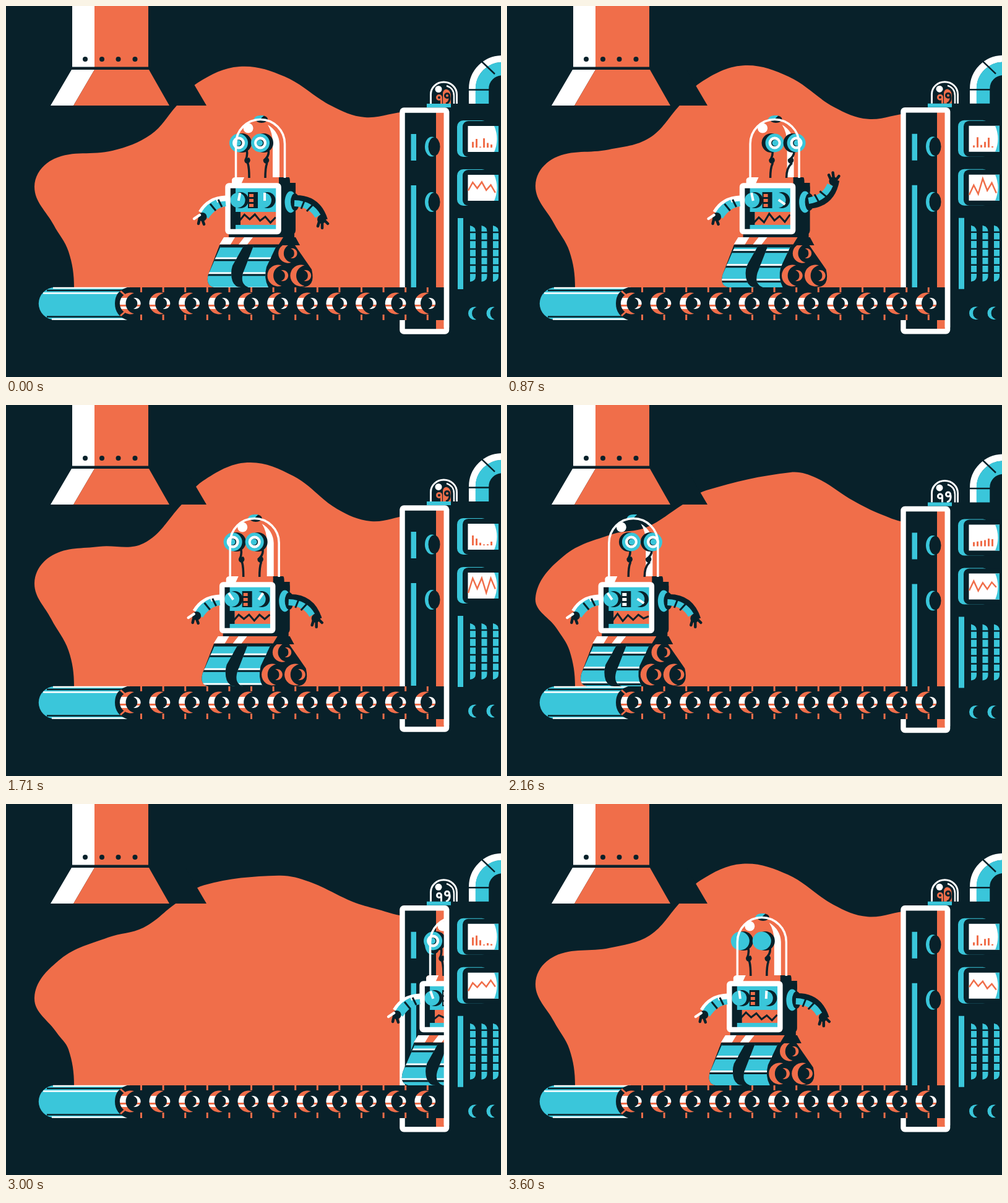
An HTML page for the animation above (3.63 s loop, 800 px wide and 600 px high).

```html
<!DOCTYPE html>
<html lang="en">
<head>
<meta charset="utf-8">
<title>Robot factory</title>
<style>
html, body { margin: 0; height: 100%; overflow: hidden; background: #08212a }
svg { display: block; width: 800px; height: 600px }
.d { fill: #08212a } .o { fill: #f06e4a } .t { fill: #3ac6da } .w { fill: #fff }
.ld, .lo, .lt, .lw { fill: none }
.ld { stroke: #08212a } .lo { stroke: #f06e4a } .lt { stroke: #3ac6da } .lw { stroke: #fff }
.lamp { fill: #fff } .ring { stroke: #fff; fill: none } .glow { fill: none }
.on .lamp, .on .glow { fill: #f06e4a }
.on .ring { stroke: #08212a } .on .ring .left { stroke: #f06e4a }
</style>
</head>
<body>
<svg viewBox="0 0 800 600">
  <defs>
    <path id="wheel" d="M5.4 -16.6A17.5 17.5 0 1 0 5.4 16.6A17 17 0 0 1 5.4 -16.6
      M4.5 -8.6A9 9 0 1 1 4.5 8.6A9 9 0 0 0 4.5 -8.6"/>
    <linearGradient id="bands" gradientUnits="userSpaceOnUse" x1="0" y1="-18" x2="0" y2="18">
      <stop offset=".24" stop-color="#f06e4a"/><stop offset=".24" stop-color="#fff"/>
      <stop offset=".56" stop-color="#fff"/><stop offset=".56" stop-color="#f06e4a"/>
      <stop offset=".64" stop-color="#f06e4a"/><stop offset=".64" stop-color="#fff"/>
      <stop offset=".74" stop-color="#fff"/><stop offset=".74" stop-color="#f06e4a"/>
    </linearGradient>
    <g id="knob"><ellipse class="t" cx="688" rx="11" ry="16"/><ellipse class="d" cx="692" rx="9.5" ry="15"/></g>
    <g id="screen">
      <rect class="t" x="729" y="185" width="50" height="59" rx="10"/>
      <rect class="d" x="738" y="186" width="70" height="58" rx="9"/>
      <path class="w" d="M746.5 194H796V236H746.5z"/>
      <path class="t" d="M789 194H796V236H789Q798 215 789 194"/>
    </g>
    <path id="grill" class="t" d="M0 355q9 2 9 10V437q0 8 -9 9z"/>
    <g id="moon"><circle class="t" r="10.5"/><circle class="d" cx="6" r="10.5"/></g>
    <clipPath id="outside"><path d="M0 0H708V600H0z"/></clipPath>
    <clipPath id="treads"><path id="treadShape" d="M347 388H384L366 420Q362 432 366 445Q370 455 380 455H336Q322 452 327 434z
      M400 388H437L421 422Q416 440 424 455H392Q378 450 383 432z"/></clipPath>
  </defs>
  <rect class="d" width="800" height="600"/>
  <path id="blob" class="o"/>
  <path class="d" d="M230 0H290V103L324 161H230z"/>

  <g id="machine">
    <g id="pipe" fill="none">
      <path class="lw" stroke-width="11" d="M753.5 158V134A48.5 48.5 0 0 1 802 85.5"/>
      <path class="lt" stroke-width="21.5" d="M769.5 158V134A32.5 32.5 0 0 1 802 101.5"/>
      <path class="ld" stroke-width="2.5" d="M746 135.5H782M769 90L790 110"/>
    </g>
    <g id="beacon">
      <path class="glow" d="M706 158V140Q708 134 713 135Q719 137 719 147V158z"/>
      <circle class="w" cx="699" cy="134.5" r="5.5"/>
      <path class="lw" stroke-width="2.5" d="M712 129Q724 133 724 145V158"/>
      <g class="ring" stroke-width="3">
        <path class="left" d="M703.500 148a3.500 3.500 0 1 0 -7 0a3.500 3.500 0 1 0 7 0V158"/>
        <path d="M716.500 145a3.500 3.500 0 1 0 -7 0a3.500 3.500 0 1 0 7 0Q719 155 711 158"/>
      </g>
      <path class="lw" stroke-width="3" d="M686.5 158V143A21 20 0 0 1 728.5 143V158"/>
      <path class="t" d="M680 158H719V164H680z"/>
    </g>
    <use href="#screen"/><use href="#screen" y="79"/>
    <path id="bars" class="lo" stroke-width="3"/>
    <path id="graph" class="lo" stroke-width="2.5"/>
    <path class="t" d="M730 343H739V458H730z"/>
    <use href="#grill" x="750"/><use href="#grill" x="768.5"/><use href="#grill" x="787"/>
    <path class="ld" stroke-width="2.5" d="M745 366H800M745 379H800M745 393H800M745 406H800M745 419H800M745 432H800"/>
    <use href="#moon" x="757.5" y="497"/><use href="#moon" x="787" y="497"/>
    <rect class="d" x="640.5" y="168" width="71.5" height="359"/>
    <path class="o" d="M695 172H709V523H695z"/>
    <path class="t" d="M654.5 207H663V250H654.5zM654.5 290H663V456H654.5z"/>
    <use href="#knob" y="227.5"/><use href="#knob" y="317"/>
    <rect class="lw" x="640.5" y="168.5" width="71.5" height="358" rx="2.5" stroke-width="8.5"/>
  </g>

  <g id="belt">
    <path class="t" d="M210 455H79A26 26 0 0 0 79 507.5H210z"/>
    <path class="lw" stroke-width="2.5" d="M76 456H200M60 464.5H190M74 506.5H200"/>
    <path class="ld" stroke-width="2.5" d="M66 460H200M66 502.5H200"/>
    <path class="d" d="M708 455H196Q176 461 176 481T196 508H708z"/>
    <path id="ticks" class="lo" stroke-width="3"/>
    <g id="rollers" fill="url(#bands)"></g>
  </g>

  <g clip-path="url(#outside)"><g id="robot">
    <path class="d" d="M345 387H467L494 426Q501 455 477 455H336Q322 452 327 434z"/>
    <use href="#treadShape" class="t"/>
    <g clip-path="url(#treads)">
      <path class="ld" stroke-width="3" d="M330 389H450"/>
      <path id="light" class="lw" stroke-width="3"/><path id="dark" class="ld" stroke-width="3"/>
    </g>
    <g class="o"><use href="#wheel" transform="translate(456 400) scale(.9)"/><use href="#wheel" x="440" y="436"/><use href="#wheel" x="477" y="436"/></g>
    <path class="d" d="M360 366H466V374H468L475 387H345L352 374H360z"/>
    <path class="o" d="M352 374H448L441 385.5H345z"/>
    <path class="w" d="M352 374H370L363 385.5H345zM385 374H399L390 385.5H376z"/>
    <rect class="d" x="366" y="286" width="102" height="84" rx="7"/>
    <path class="d" d="M440 277H457Q459 277 459 286H468V300H440z"/>
    <path class="o" d="M371 277H441V288H365V281Q366 277 371 277z"/>
    <path class="w" d="M371 277H385L380 288H365V281Q366 277 371 277z"/>

    <ellipse class="d" cx="413" cy="183" rx="10" ry="6"/>
    <path class="t" d="M400 184Q402 177 411 177H417L410 184z"/>
    <path class="w" d="M423 192Q441 203 442 223V277H431V222Q431 205 423 192"/>
    <path id="stalks" class="ld" stroke-width="3.5"/>
    <g id="eyes"></g>
    <circle class="w" cx="391.5" cy="197.5" r="8"/>
    <path class="lw" stroke-width="3.5" d="M371.5 278V223A39.5 39.5 0 0 1 450.5 223V278"/>

    <rect class="t" x="358" y="290" width="83" height="76"/>
    <path class="d" d="M362 294H371V361H362zM371 333H379V354H371z"/>
    <circle class="d" cx="379" cy="314" r="13"/><circle class="t" cx="374.5" cy="314" r="12"/>
    <circle class="d" cx="422.5" cy="314" r="13"/><circle class="t" cx="417" cy="314" r="12"/>
    <path class="d" d="M391 301H407V327H391z"/>
    <path class="lamp" d="M393 304H400V309H393zM393 312H400V317H393zM393 320H400V325H393z"/>
    <g class="lw" stroke-width="4"><path id="needle1" d="M376 315V302"/><path id="needle2" d="M418 315V302"/></g>
    <path class="o" d="M379 333H437V354H379z"/>
    <path id="mouth" class="ld" stroke-width="3"/>
    <rect class="lw" x="358.5" y="290.5" width="82" height="74.5" rx="2" stroke-width="8.5"/>

    <g id="leftArm">
      <path class="lt" stroke-width="10" d="M355 319Q336 321 323 341"/>
      <path class="lw" stroke-width="9" d="M355 311Q328 312 315 334"/>
      <path class="lt" stroke-width="8" d="M341 317Q327 323 319 336"/>
      <path class="ld" stroke-width="3" d="M343 313L349 325M330 320L339 331"/>
      <circle class="d" cx="317.5" cy="341" r="7"/>
      <g stroke-width="4.5" stroke-linecap="round"><path class="ld" d="M313 343L311 352M317 345L320 353"/><path class="lw" d="M313 338L304 344"/></g>
    </g>
    <ellipse class="t" cx="460" cy="317" rx="9.5" ry="17.5"/>
    <ellipse class="d" cx="467" cy="317" rx="7" ry="14"/>
    <g id="rightArm">
      <path class="ld" stroke-width="10" d="M465 311Q503 309 515 346"/>
      <path class="lt" stroke-width="10" d="M466 319Q493 320 504 340"/>
      <path class="ld" stroke-width="3" d="M483 313L477 328M497 320L486 332"/>
      <circle class="d" cx="510" cy="345" r="7"/>
      <path class="ld" stroke-width="4.5" stroke-linecap="round" d="M507 346L504 356M511 347L511 359M513 345L520 352"/>
    </g>
  </g></g>

  <path id="jamb" class="w" d="M707.7 170H716.2V520H707.7z"/>
  <path class="w" d="M107 0H143V98.5H107zM106 103H143L109 161H72z"/>
  <path class="o" d="M143 0H230V98.5H143zM143 103H231L264 161H109z"/>
  <g class="d"><circle cx="128" cy="86" r="4"/><circle cx="155" cy="86" r="4"/><circle cx="181.5" cy="86" r="4"/><circle cx="208.5" cy="86" r="4"/></g>
  <circle id="pulse" class="lw" cx="196.7" cy="315"/>
</svg>
<script>
const LOOP = 3630, BEAT = LOOP / 4;
const $ = id => document.getElementById(id);
const set = (id, name, value) => $(id).setAttribute(name, value);
const range = (n, f) => Array.from({ length: n }, (_, i) => f(i)).join('');
const clamp = (v, a = 0, b = 1) => Math.min(b, Math.max(a, v));
const mix = (a, b, u) => a + (b - a) * u;
const smooth = u => u * u * (3 - 2 * u);

set('ticks', 'd', 'M185 461L194 469M185 501L194 493' +
  range(14, i => `M${218.5 + i * 35.6} 455v8m0 36v9`));
$('rollers').innerHTML = range(11, i => `<use href="#wheel" x="${201.5 + i * 47.65}" y="481"/>`);
$('eyes').innerHTML = range(2, i => `<g transform="translate(${376 + 35 * i} 221.5)">
  <circle class="shade d" r="15.5"/><circle class="t" r="15"/>
  <g class="iris"><circle class="w" r="10"/><circle class="d" r="5.5"/><circle class="pupil t" r="5"/></g></g>`);

// Outline of the backdrop: time within a beat, then x, y pairs
const poses = [
  [0, 77,354, 46,292, 78,247, 172,234, 234,208, 276,161, 310,124, 377,98, 450,114, 525,161, 580,180, 650,171],
  [277, 82,370, 46,313, 88,251, 165,216, 222,200, 274,161, 320,131, 440,116, 490,126, 560,158, 600,170, 650,182],
  [345, 80,361, 46,312, 92,244, 170,209, 225,198, 284,161, 322,138, 458,109, 500,118, 560,155, 605,177, 650,190],
  [570, 74,343, 46,297, 78,236, 145,209, 215,216, 297,161, 330,135, 432,93, 495,116, 555,170, 600,191, 650,197],
  [802, 73,346, 46,288, 75,243, 150,229, 222,224, 284,161, 318,123, 390,93, 465,115, 535,168, 590,188, 650,179]
];
poses.push([BEAT, ...poses[0].slice(1)]);

function blobPath(phase) {
  const i = poses.findIndex(p => p[0] > phase), a = poses[i - 1], b = poses[i];
  const u = (phase - a[0]) / (b[0] - a[0]);
  const p = [[101, 510], [110, 455], [101, 397]];
  for (let k = 1; k < a.length; k += 2) p.push([mix(a[k], b[k], u), mix(a[k + 1], b[k + 1], u)]);
  p.push([700, 180]);
  const minus = (q, r) => [q[0] - r[0], q[1] - r[1]];
  let d = 'M110 455';
  for (let k = 1; k < p.length - 2; k++) {
    const reach = .36 * Math.hypot(...minus(p[k + 1], p[k]));
    const handle = (j, sign) => {
      const dir = minus(p[j + 1], p[j - 1]), s = sign * reach / Math.hypot(...dir);
      return [p[j][0] + s * dir[0], p[j][1] + s * dir[1]];
    };
    d += `C${handle(k, 1)} ${handle(k + 1, -1)} ${p[k + 1]}`;
  }
  return d + 'V455z';
}

function robotShift(t) {
  if (t < 1250) return t * .0248;
  if (t < 2600) return 30.5 - 236.5 * (Math.min(t - 1250, 960) / 910) ** 2.62;
  return 316 * ((3720 - t) / 720) ** 3 - .6;
}

function track(keys, t) {
  const i = keys.findIndex(k => k[0] > t), [t0, a] = keys[i - 1], [t1, b] = keys[i];
  return mix(a, b, smooth((t - t0) / (t1 - t0)));
}
const gaze = [[0, 0], [200, 0], [430, 1], [1000, 1], [1420, 0], [1850, 0], [2210, .95], [2600, 0], [LOOP, 0]];
const wave = [[0, 1], [300, 1], [480, -1], [900, -1], [1080, 1], [LOOP, 1]];

function draw(now) {
  const t = now % LOOP, phase = t % BEAT;
  const osc = (n, i = 0) => Math.sin(t / LOOP * Math.PI * 2 * n + i * 2.4);
  const zigzag = (x, y, step, n, amp) => 'M' + range(n, i =>
    `${x + i * step} ${y + (i % 2 ? -1 : 1) * amp * (.6 + .4 * osc(9 + i % 3, i))} `);

  set('blob', 'd', blobPath(phase));
  document.body.classList.toggle('on', (phase + 210) % BEAT < 400);

  const bob = `translate(0 ${-1.35 * (1 - Math.cos(t / LOOP * Math.PI * 24))})`;
  set('machine', 'transform', bob);
  set('jamb', 'transform', bob);
  const swell = 1 + .6 * Math.sin(Math.PI * clamp((t - 2530) / 370)) ** 2;
  set('pipe', 'transform', `translate(774 158) scale(${swell}) translate(-774 -158)`);
  set('bars', 'd', range(6, i => `M${754.5 + i * 6} 229v${-9 - 7.5 * osc(11 + i % 4, i)}`));
  set('graph', 'd', zigzag(747, 293, 7.3, 7, 9 + 5 * osc(5)));

  const dx = robotShift(t), pull = t < 2600 ? clamp((t - 2210) / 230) ** 2 : 0;
  $('robot').style.display = t > 2440 && t < 2860 ? 'none' : '';
  set('robot', 'transform', `translate(${410 + dx} ${455 - 460 * pull}) ` +
    `scale(${1 - .6 * Math.sqrt(pull)} ${1 + .25 * pull}) translate(-410 -455)`);

  const roll = ((20 + dx * .5) % 24 + 24) % 24;
  const stripes = y => range(4, i => `M320 ${y + roll + (i - 1) * 24}h130`);
  set('light', 'd', stripes(388));
  set('dark', 'd', stripes(391));

  const q = track(gaze, t);
  set('eyes', 'transform', `translate(${35 * q} 0)`);
  document.querySelectorAll('.shade').forEach(e => e.setAttribute('cx', 5.5 - 11 * q));
  document.querySelectorAll('.pupil').forEach(e => e.setAttribute('cx', 2 * q - 1));
  document.querySelectorAll('.iris').forEach(e => e.style.display = t > 3530 && t < 3615 ? 'none' : '');
  set('stalks', 'd', range(2, i => {
    const top = 389 + 35 * i + 18 * q, base = 393 + 26 * i + 11 * q, mid = (top + base) / 2 - 2 + 2 * q;
    return `M${top} 233Q${top + 2} 242 ${mid - 2} 249a3 3.5 0 1 0 5 -2q-5 2 -1 8Q${base} 262 ${base} 278`;
  }));

  set('needle1', 'transform', `rotate(${10 + 45 * osc(8)} 376 314)`);
  set('needle2', 'transform', `rotate(${65 * (1 - Math.cos(t / LOOP * Math.PI * 12))} 418 314)`);
  set('mouth', 'd', zigzag(377, 343.5, 8.4, 8, 7 + 2 * osc(6)));
  set('rightArm', 'transform', `translate(466 317) rotate(${t > 430 && t < 950 ? 8 * Math.sin((t - 570) / 60) : 0}) ` +
    `scale(1 ${track(wave, t)}) translate(-466 -317)`);

  const p = clamp((t - 1140) / 300), live = p > 0 && p < 1;
  set('pulse', 'r', live ? 26 * (1 - (1 - p) ** 2) : 0);
  set('pulse', 'stroke-width', live ? 11 * (1 - p) : 0);
}

const start = performance.now();
(function frame() {
  draw(performance.now() - start);
  requestAnimationFrame(frame);
})();
</script>
</body>
</html>
```
